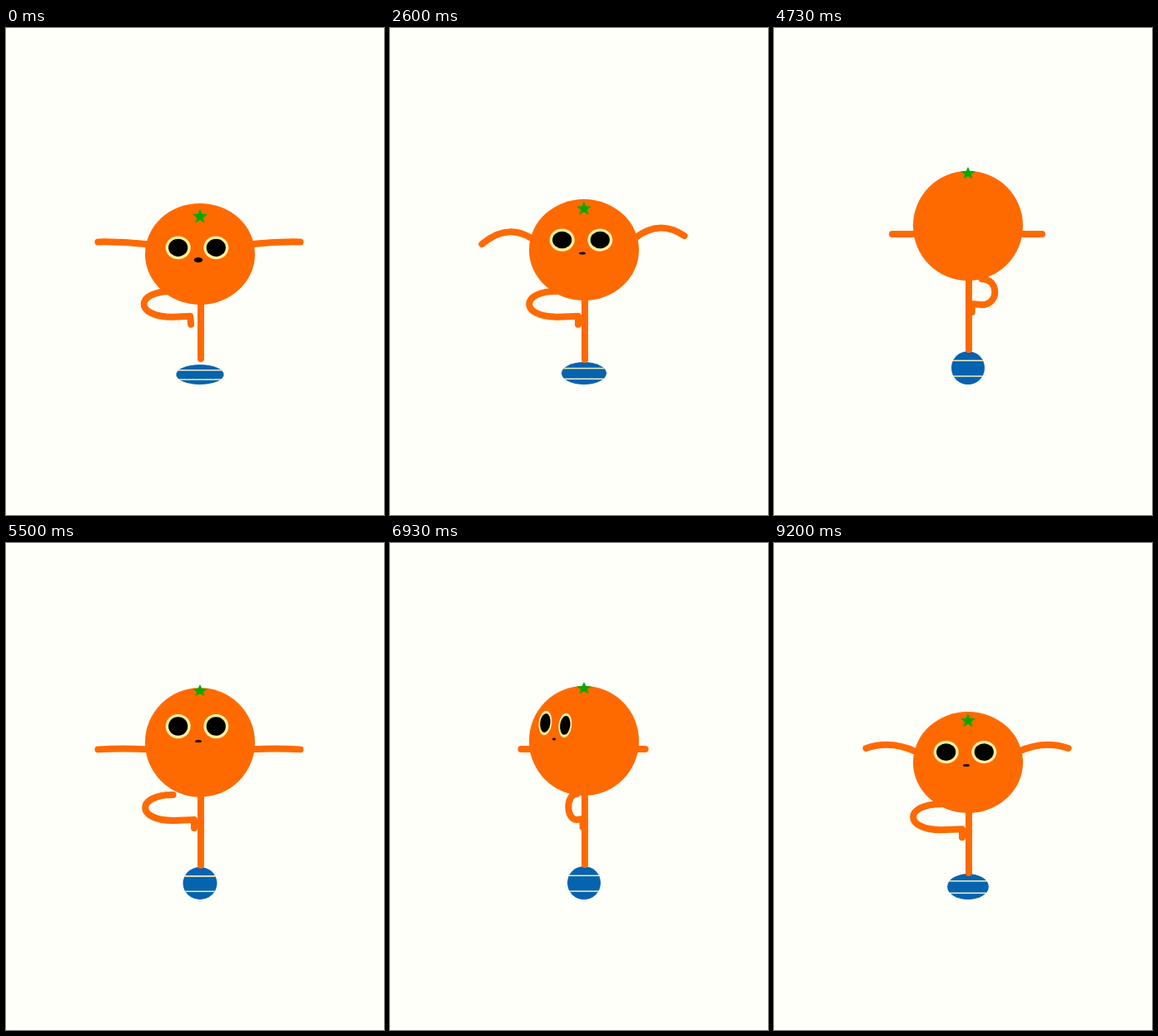
An HTML page for the animation above (9230 ms loop, 454 by 586 pixels).

```html
<!DOCTYPE html>
<html lang="en">
<head>
<meta charset="utf-8">
<title>Dancing orange</title>
<style>
  html, body { margin: 0; width: 100%; height: 100%; overflow: hidden; background: #fffffa; }
  svg { display: block; width: 100vw; height: 100vh; }
  .limb { fill: none; stroke: #ff6a00; stroke-width: 8; stroke-linecap: round; stroke-linejoin: round; }
</style>
</head>
<body>
<svg viewBox="0 0 454 586">
  <defs>
    <clipPath id="ballClip"><ellipse id="ballEdge" cx="233"/></clipPath>
    <clipPath id="bodyClip"><ellipse id="bodyEdge" cx="233" rx="66"/></clipPath>
  </defs>
  <rect width="454" height="586" fill="#fffffa"/>
  <ellipse id="ball" cx="233" fill="#0563b0"/>
  <path id="stripes" clip-path="url(#ballClip)" stroke="#f3f0b4" stroke-width="1.6"/>
  <path id="arms" class="limb"/>
  <path id="stand" class="limb"/>
  <path id="raised" class="limb"/>
  <ellipse id="body" cx="233" rx="66" fill="#ff6a00"/>
  <g clip-path="url(#bodyClip)">
    <g id="face">
      <ellipse id="rimL" fill="#fff0a0"/><ellipse id="pupilL"/>
      <ellipse id="rimR" fill="#fff0a0"/><ellipse id="pupilR"/>
      <ellipse id="mouth"/>
    </g>
  </g>
  <path id="star" fill="#00aa00"/>
</svg>
<script>
const LOOP = 9230, PERIOD = 2985;
const SPIN_START = 630, SPIN_TIME = 1870, HOP_START = -485;

// time from landing, body bottom, body height, ball height, foot, star drop,
// shoulder, hand, arm bow, mouth, eye
const HOP = [
  [-485, 304, 132, 40, 387, 3,    248, 248, 0,  1.5, 14.7],
  [-385, 328, 122, 27, 399, 11.5, 253, 255, 11, 1.5, 13.6],
  [-325, 312, 130, 36, 389, 7,    246, 256, 5,  2.5, 14],
  [-190, 280, 132, 41, 364, 3,    224, 226, 0,  2,   14.7],
  [-45,  310, 130, 38, 390, 8,    246, 234, -3, 2,   14.5],
  [0,    333, 122, 24, 398, 16,   260, 257, 1,  3,   14],
  [30,   326, 125, 25, 393, 12.5, 263, 263, -2, 4,   10.5],
  [120,  301, 131, 41, 381, 4,    246, 256, 2,  2.5, 13],
  [245,  325, 122, 31, 397, 11,   251, 247, 6,  1.5, 13.6],
  [330,  304, 131, 40, 386, 5,    249, 251, 1,  1.5, 14.5],
  [400,  304, 132, 40, 387, 3,    248, 248, 0,  1.5, 14.7]
];

const get = id => document.getElementById(id);
const set = (id, attrs) => {
  for (const key in attrs) get(id).setAttribute(key, attrs[key]);
};

function slope(i, col) {
  if (i === 0 || i === HOP.length - 1) return 0;
  const a = HOP[i - 1], b = HOP[i + 1], here = HOP[i][col];
  if ((here - a[col]) * (b[col] - here) <= 0) return 0;
  return (b[col] - a[col]) / (b[0] - a[0]);
}

function hopPose(t) {
  const last = HOP.length - 1;
  if (t <= HOP[0][0] || t >= HOP[last][0]) return HOP[0].slice(1);
  let i = 0;
  while (t > HOP[i + 1][0]) i++;
  const a = HOP[i], b = HOP[i + 1], span = b[0] - a[0];
  const u = (t - a[0]) / span, v = 1 - u;
  return a.slice(1).map((_, k) => {
    const c = k + 1;
    return a[c] * v * v * (1 + 2 * u) + b[c] * u * u * (3 - 2 * u)
      + span * u * v * (v * slope(i, c) - u * slope(i + 1, c));
  });
}

function turnAngle(t) {
  const u = Math.min(1, Math.max(0, (t - SPIN_START) / SPIN_TIME));
  return 2 * Math.PI * u - 0.225 * Math.sin(2 * Math.PI * u);
}

function starPath(cx, cy, r, squash) {
  let d = "";
  for (let i = 0; i < 10; i++) {
    const a = i * Math.PI / 5, q = i % 2 ? r * 0.42 : r;
    d += (i ? "L" : "M") + (cx + q * Math.sin(a)) + " " + (cy - q * squash * Math.cos(a));
  }
  return d + "Z";
}

function drawBall(h) {
  const shape = { cy: 429 - h / 2, rx: 20 + (40 - h) * 0.54, ry: h / 2 };
  set("ball", shape);
  set("ballEdge", shape);
  const y1 = 429 - h * 0.72, y2 = 429 - h * 0.25;
  set("stripes", { d: `M190 ${y1}H276M190 ${y2}H276` });
}

function drawArms(turn, shoulder, hand, bow) {
  const reach = Math.max(62, 121.5 * Math.abs(Math.cos(turn)));
  const skew = Math.max(0, bow - 6);
  const arm = (side, y) => {
    const tip = 232 + side * reach, root = 232 + side * 62;
    return `M${tip} ${y}Q${(tip + root) / 2} ${(y + shoulder) / 2 - 2 * bow} ${root} ${shoulder}`;
  };
  set("arms", { d: arm(-1, hand + skew) + arm(1, hand - skew) });
}

function drawLegs(turn, bottom, foot, drop, open) {
  set("stand", { d: `M234 ${bottom - 20}V${foot}` });
  const knee = -72 * Math.cos(turn + 0.384) - open;
  const hipY = bottom - 2 - drop * 1.1, shinY = bottom + 28 - drop * 1.1;
  const x = f => 234 + knee * f;
  const toe = x(0.12) - open * 3;
  set("raised", {
    d: `M${x(0.5)} ${hipY}C${x(1.167)} ${hipY} ${x(1.167)} ${shinY + 1} ${x(0.5)} ${shinY + 1}`
      + `L${toe} ${shinY}L${toe + open * 0.6} ${shinY + 10}`
  });
}

function drawFace(turn, midY, drop, mouth, eye) {
  const side = turn > Math.PI ? 1 : -1;
  const s = Math.min(turn, 2 * Math.PI - turn) / (70 * Math.PI / 180);
  const seen = s < 1;
  set("face", { visibility: seen ? "visible" : "hidden" });
  if (!seen) return;
  const q = s * s, w = 1 - 0.85 * q;
  const cx = 229.5 + side * 56 * q, cy = midY - 20 + drop * 0.95;
  set("face", { transform: `rotate(${-side * 12 * q} ${cx} ${cy})` });
  for (const [name, dir] of [["L", -1], ["R", 1]]) {
    const x = cx + dir * 22.8 * w;
    set("rim" + name, { cx: x, cy, rx: 15 * w, ry: eye });
    set("pupil" + name, { cx: x, cy, rx: 11.6 * w, ry: eye - 3.3 });
  }
  set("mouth", {
    cx: cx + 1.5 * w, cy: midY - 2 + drop * 0.7,
    rx: (4 + (mouth - 1.5) * 0.8) * w, ry: mouth
  });
}

function draw(time) {
  const t = time % PERIOD;
  const hopTime = t > PERIOD + HOP_START ? t - PERIOD : t;
  const [bottom, height, ball, foot, star, shoulder, hand, bow, mouth, eye] = hopPose(hopTime);
  const turn = turnAngle(t), drop = star - 3;
  const midY = bottom - height / 2;
  drawBall(ball);
  drawArms(turn, shoulder, hand, bow);
  drawLegs(turn, bottom, foot, drop, mouth - 1.5);
  set("body", { cy: midY, ry: height / 2 });
  set("bodyEdge", { cy: midY, ry: height / 2 });
  drawFace(turn, midY, drop, mouth, eye);
  set("star", { d: starPath(233, bottom - height + star, 9.5, 0.83 + drop * 0.013) });
}

const begin = performance.now();
function tick() {
  draw((performance.now() - begin) % LOOP);
  requestAnimationFrame(tick);
}
tick();
</script>
</body>
</html>
```
